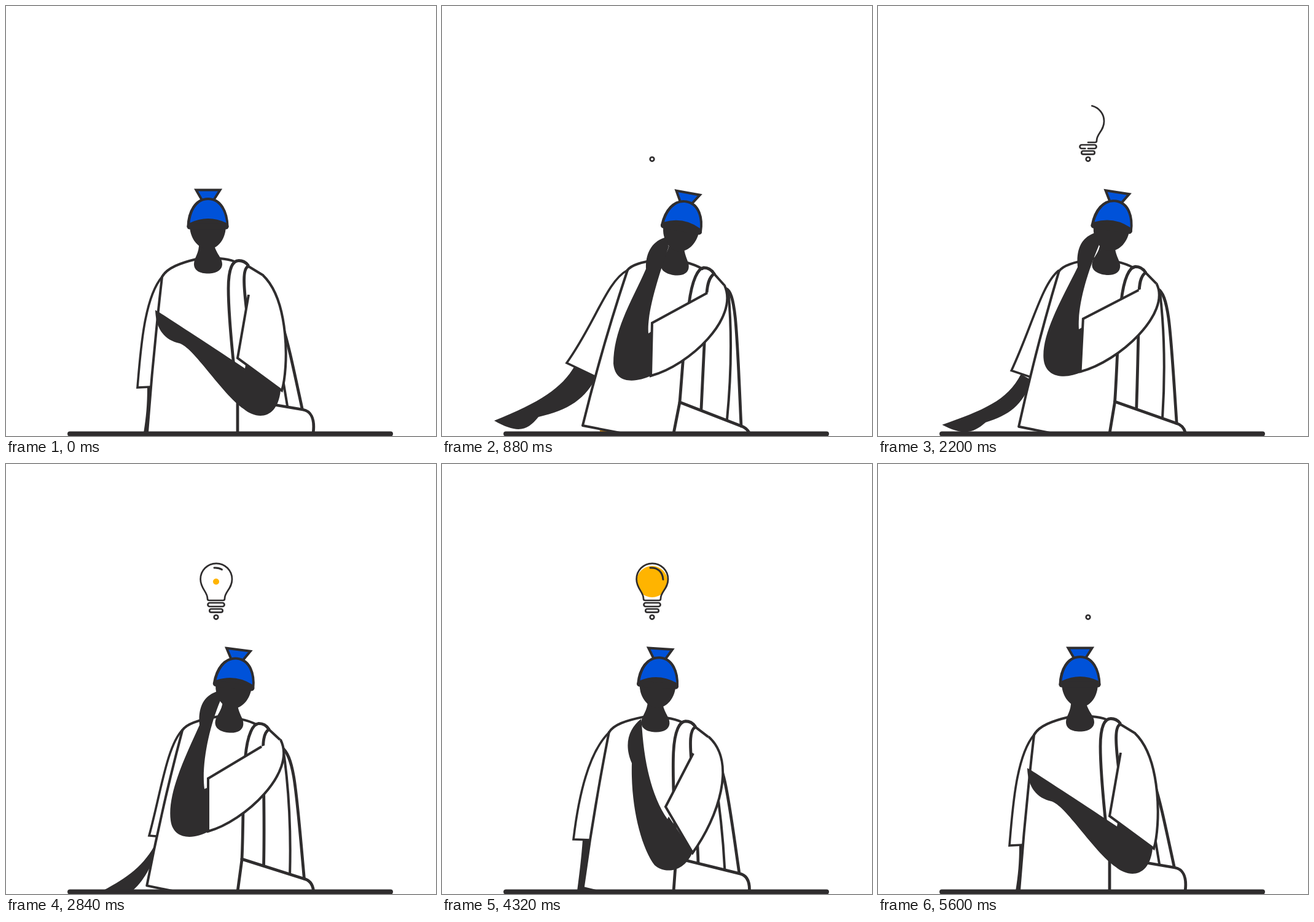
Animation of 700 by 700 pixels, one loop 5.64 s. Source, as an HTML page:

```html
<!DOCTYPE html>
<html lang="en">
<head>
<meta charset="utf-8">
<title>Thinking up an idea</title>
<style>
  html, body { margin: 0; width: 100%; height: 100%; overflow: hidden; background: #fff; }
  svg { display: block; width: 100vw; height: 100vh; }
  .line { fill: none; stroke: #2f2d2e; stroke-width: 4; stroke-linecap: round; stroke-linejoin: round; }
  .strap { stroke-width: 4.8; }
  .cloth { fill: #fff; stroke-linecap: butt; stroke-linejoin: miter; }
  .dark { fill: #2f2d2e; }
  .blue { fill: #0052d9; }
  .thin { stroke-width: 2.7; }
</style>
</head>
<body>
<svg viewBox="0 0 700 700">
  <defs>
    <clipPath id="floor"><rect width="700" height="694"/></clipPath>
    <clipPath id="sky"><rect y="58" width="700" height="500"/></clipPath>
    <clipPath id="glass"><use href="#bulb"/></clipPath>
  </defs>

  <g clip-path="url(#floor)">
    <path id="backOuter" class="line strap"/>
    <path id="backInner" class="line"/>
    <path id="leftArm" class="dark"/>
    <path id="leftSleeve" class="line cloth" style="stroke-width:3.6"/>
    <path id="leg" d="M257,692 H284" stroke="#c98416" stroke-width="3"/>
    <path id="torso" fill="#fff"/>
    <path id="strapInner" class="line strap"/>
    <path id="bag" class="line strap"/>
    <path id="side" class="line"/>
    <path id="neckLeft" class="line"/>
    <path id="neckRight" class="line"/>
    <path id="strapOuter" class="line strap"/>
    <path id="shoulder" class="line"/>
  </g>

  <g id="head">
    <path class="dark" d="M314,386 C315,402 306,410 306,420 C306,431 316,435.500 329,435.500 C342,435.500 352,430 352,420 C352,410 344,406 339,390 Z"/>
    <path class="dark" d="M299,354 C298,380 315,396 329,396 C344,396 359,380 358,354 Z"/>
    <path class="line blue" style="stroke-linejoin:miter" d="M309.500,299.500 H348.500 L338,316 H319 Z"/>
    <path class="line dark" d="M296.500,359 C297,335 308,314 329,314 C350,314 360,335 360.500,359"/>
    <path class="line" style="stroke-width:9" d="M299,359 H358"/>
    <path class="blue" d="M299.500,353 C302,332 312,316 329,316 C346,316 356,332 358.500,353 Q329,339 299.500,353 Z"/>
  </g>

  <path id="arm" class="dark"/>
  <path id="sleeve" class="line cloth"/>
  <path d="M104,696.500 H626" class="line" style="stroke-width:8"/>

  <g clip-path="url(#sky)"><g id="rays"></g></g>
  <g id="lamp">
    <circle id="glow" cx="342" cy="191.500" fill="#ffb400" clip-path="url(#glass)"/>
    <path id="bulb" class="line thin" pathLength="1" d="M342,222 H353.500 Q356,222 356,219 C356,208 368,203 368,187.500 A25.700,25.700 0 0 0 316.600,187.500 C316.600,203 328,208 328,219 Q328,222 330.500,222 Z"/>
    <path id="shine" class="line thin" style="stroke-width:3" pathLength="1" d="M339,169 C352,168 360,177 360,190"/>
    <path id="coilTop" class="line thin" pathLength="1" d="M342,232 H352.500 a3,3 0 0 0 0,-6 H331.500 a3,3 0 0 0 0,6 Z"/>
    <path id="coilLow" class="line thin" pathLength="1" d="M342,241.400 H350 a2.700,2.700 0 0 0 0,-5.400 H334 a2.700,2.700 0 0 0 0,5.400 Z"/>
    <circle id="tip" class="line thin" cx="342" cy="249.300"/>
  </g>
</svg>

<script>
const LOOP = 5640, STEP = 40;
const $ = id => document.getElementById(id);
const NUM = /-?\d+(\.\d+)?/g;
const nums = s => s.match(NUM).map(Number);
const put = (s, v) => { let i = 0; return s.replace(NUM, () => v[i++].toFixed(2)); };
const lerp = (a, b, k) => a + (b - a) * k;
const clamp = x => Math.min(1, Math.max(0, x));
const ramp = (t, a, b) => clamp((t - a) / (b - a));

// Limb poses: upright, far lean, three steps back, arm dropping
const UP = 0, LEAN = 1, BACK1 = 2, BACK2 = 3, BACK3 = 4, DROP = 5, SLOW = 6;
const posed = {
  lean: ['0', '1', '0.88', '0.69', '0.55', '0.37'],
  leftSleeve: [
    'M254,441 C225,475 219,560 214,621 L236,620',
    'M302,430 C268,448 250,515 203,581 L251,604',
    'M296,430 C268,450 250,520 214,591 L247,603',
    'M288,432 C262,458 252,535 233,605 L245,606',
    'M280,433 C252,458 240,535 227,609 L243,610',
    'M272,437 C240,468 223,535 214,611 L241,612'
  ],
  leftArm: [
    'M230,620 C230,650 228,670 224,695 C227,700 229,700 233,698 C234,670 236,640 238,620 Z',
    'M216,586 C195,622 160,645 85,675 C125,698 140,690 157,669 C205,658 235,640 253,600 Z',
    'M230,596 C208,640 165,655 95,679 C135,700 150,692 170,674 C210,664 235,650 250,608 Z',
    'M245,615 C225,655 195,675 155,696 C170,705 190,705 203,697 C225,680 240,650 250,615 Z',
    'M241,612 C238,640 225,665 213,695 C215,700 222,700 230,698 C240,680 245,650 250,612 Z',
    'M229,612 C227,640 224,665 220,695 C222,700 225,700 232,698 C236,670 238,640 243,612 Z'
  ],
  arm: [
    'M243,495 C244,530 262,545 282,549 C305,555 350,630 387,656 C410,675 442,672 447,626 L390,584 L389,590 C350,564 310,538 250,499 Z',
    'M366,376 C342,382 331,402 332,428 C312,475 279,525 279,582 C282,618 318,612 340,602 L342,529 L336,533 C333,500 353,438 369,392 Z',
    'M356,369 C334,376 324,395 327,425 C305,470 268,530 270,572 C272,608 310,606 331,596 L333,523 L328,526 C326,490 341,440 362,390 Z',
    'M345,370 C323,376 312,395 315,425 C295,470 262,535 268,580 C272,612 305,612 330,598 L330,526 L323,529 C318,490 330,430 349,385 Z',
    'M339,377 C318,380 306,400 309,432 C298,470 272,530 275,590 C278,628 312,623 339,607 L333,537 L326,541 C318,490 327,440 344,390 Z',
    'M324,415 C305,430 295,455 309,487 C307,560 325,625 346,653 C360,666 392,668 408,632 L369,574 L367,578 C340,540 328,480 325,420 Z'
  ],
  sleeve: [
    'M395,470 L377,573 L449,626 C460,590 462,480 418,438',
    'M432,467 L342,516 L340,602 C403,585 484,508 460,455',
    'M426,463 L335,509 L330,595 C395,578 478,500 455,453',
    'M416,460 L329,512 L329,598 C388,582 474,502 447,449',
    'M412,461 L331,521 L339,607 C390,590 470,505 441,447',
    'M409,471 L364,558 L408,633 C450,575 480,485 434,444'
  ]
};
const keys = [[0, UP], [230, DROP], [660, LEAN], [880, LEAN], [1600, BACK1], [2440, SLOW],
              [2840, BACK2], [3760, BACK3], [4320, DROP], [5560, UP]];

// Body parts that follow the lean alone: upright and fully leaning
const leaned = {
  backOuter: ['M418,462 C450,500 455,530 482,655', 'M462,460 C479,466 480,530 487,684'],
  backInner: ['M418,462 Q443,555 458,651', 'M466,463 Q475,560 464,673'],
  torso: ['M254,441 Q239.500,567 230,694 L232,695 L377,695 L377,645 C375,620 362,520 362,460 L395,424 L350,411 L310,412 Z',
          'M302,430 Q260,556 229,683 L290,695 L377,695 L387,645 C392,585 395,530 402,485 L443,436 L398,417 L340,414 Z'],
  strapInner: ['M394,424 C385,428 387,455 391,490 C398,560 410,620 414,645',
               'M443,436 C434,442 432,455 431,467 C429,500 426,560 422,656'],
  strapOuter: ['M377,696 L377,645 C375,620 362,520 362,460 C362,425 370,414.500 379,414.500 C387,414.500 391,418 394,422',
               'M377,696 L387,645 C392,585 395,530 402,485 C407,445 417,427 426,426 C434,426 440,431 443,436'],
  bag: ['M377,639 L483,657 C495,659 503.500,670 500,696', 'M387,645 L485,683 C492,685 498,689 501,697'],
  side: ['M254,441 Q239.500,567 230,694 L232,696', 'M302,430 Q260,556 229,683 L290,695'],
  neckLeft: ['M254,441 C262,426 285,418 310,412', 'M302,430 C308,422 322,417 360,411'],
  neckRight: ['M348,411 Q362,412 372,416', 'M396,417 Q412,421 424,428'],
  shoulder: ['M395,424 L418,438', 'M443,436 L460,455']
};

const tracks = Object.entries(posed).map(([id, list]) => {
  const poses = list.map(nums);
  poses[SLOW] = poses[BACK1].map((a, i) => lerp(a, poses[BACK2][i], 0.3));
  return { id, shape: list[0], vals: keys.map(k => poses[k[1]]) };
});
const pairs = Object.entries(leaned).map(([id, [a, b]]) => ({ id, shape: a, from: nums(a), to: nums(b) }));

// Smooth curve through the timed poses
function sample(vals, t) {
  const last = keys.length - 1;
  if (t >= keys[last][0]) return vals[last];
  let i = 0;
  while (t >= keys[i + 1][0]) i++;
  const span = keys[i + 1][0] - keys[i][0], k = (t - keys[i][0]) / span;
  const slope = (j, n) => j === 0 || j === last ? 0 :
    (vals[j + 1][n] - vals[j - 1][n]) / (keys[j + 1][0] - keys[j - 1][0]);
  return vals[i].map((a, n) => lerp(a, vals[i + 1][n], k * k * (3 - 2 * k)) +
    span * k * (1 - k) * ((1 - k) * slope(i, n) - k * slope(i + 1, n)));
}

function drawBody(t) {
  let p = 0;
  for (const { id, shape, vals } of tracks) {
    const v = sample(vals, t);
    if (id === 'lean') p = v[0];
    else $(id).setAttribute('d', put(shape, v));
  }
  for (const { id, shape, from, to } of pairs)
    $(id).setAttribute('d', put(shape, from.map((a, i) => lerp(a, to[i], p))));
  $('head').setAttribute('transform', `translate(${49 * p} ${2.6 * p}) rotate(${10.4 * p} 329 425)`);
  $('leg').style.display = p > 0.93 ? '' : 'none';
}

// Two dashes run outwards along each of ten directions
const rays = [];
for (let i = 0; i < 10; i++) {
  for (const start of i % 2 ? [96, 33] : [127, 64]) {
    const el = document.createElementNS('http://www.w3.org/2000/svg', 'line');
    el.setAttribute('class', 'line');
    $('rays').append(el);
    rays.push({ el, start, angle: (i * 36 - 90) * Math.PI / 180 });
  }
}

function drawRays(t) {
  for (const { el, start, angle } of rays) {
    const s = start + (t - 3760) * 0.21;
    const a = Math.max(57, s + 1), b = Math.min(130, s + 21);
    el.style.display = b > a ? '' : 'none';
    [a, b].forEach((d, i) => {
      el.setAttribute('x' + (i + 1), 342 + d * Math.cos(angle));
      el.setAttribute('y' + (i + 1), 187.5 + d * Math.sin(angle));
    });
    el.style.strokeWidth = 4.4 + Math.max(0, (a + b) / 2 - 73) * 0.045;
  }
}

function trace(id, k) {
  const el = $(id);
  el.style.display = k > 0 ? '' : 'none';
  el.style.strokeDasharray = k < 1 ? `${k} 2` : 'none';
}

function drawLamp(t) {
  // The drawing plays backwards, faster, after the rays
  const u = t < 4240 ? t : t < 5440 ? lerp(3200, 1350, ramp(t, 4240, 5440)) : lerp(1350, 965, ramp(t, 5440, 5600));
  trace('coilLow', ramp(u, 965, 1870));
  trace('coilTop', ramp(u, 1365, 2270));
  trace('bulb', ramp(u, 1780, 2680));
  trace('shine', ramp(u, 2680, 3100));
  $('glow').setAttribute('r', 40 * ramp(u, 2782, 3245));
  const size = ramp(t, 680, 880);
  $('tip').setAttribute('r', 3.3 * size);
  $('tip').style.display = size > 0 ? '' : 'none';
  const swing = t > 3240 && t < 4240 ? -4 * Math.sin((t - 3240) / 400 * 2 * Math.PI) : 0;
  $('lamp').setAttribute('transform', `rotate(${swing} 342 249)`);
  $('rays').setAttribute('transform', `rotate(${swing / 2} 342 221)`);
}

function frame() {
  const t = Math.floor(performance.now() % LOOP / STEP) * STEP;
  drawBody(t);
  drawRays(t);
  drawLamp(t);
  requestAnimationFrame(frame);
}
frame();
</script>
</body>
</html>
```
